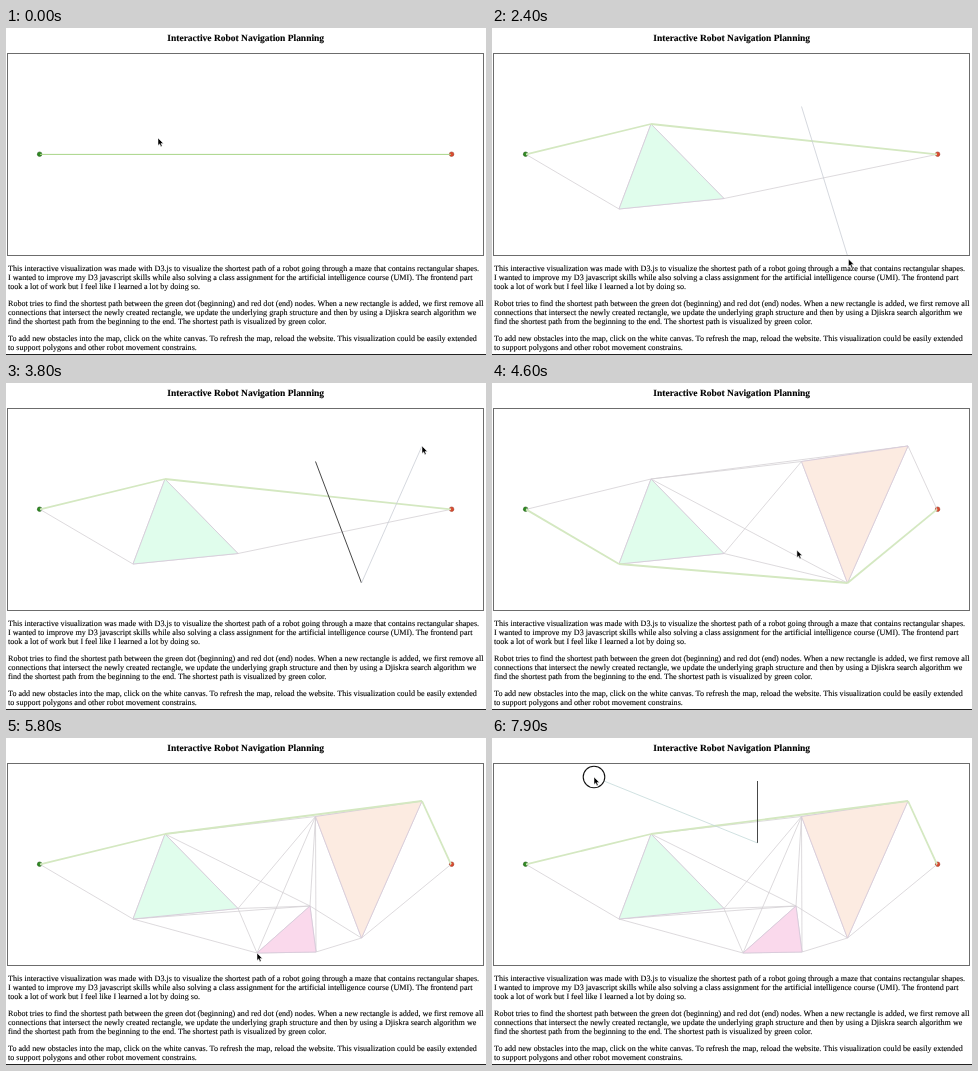
Recreate the animation shown at these times as an HTML page. Size 480x327 px, loop 8000 ms.

```html
<!DOCTYPE html>
<html lang="en">
<head>
<meta charset="utf-8">
<title>Interactive Robot Navigation Planning</title>
<style>
  html, body { margin: 0; width: 100%; height: 100%; overflow: hidden; background: #fff; }
  svg { display: block; }
  text { font: 8.1px "Liberation Serif", Times, serif; text-rendering: geometricPrecision; stroke: #000; stroke-width: .1; }
  .title { font-size: 9.49px; font-weight: bold; text-anchor: middle; }
  .edge { stroke: #d5d1d5; stroke-width: .8; }
  .route { stroke: #d4e8c1; stroke-width: 1.8; }
  .direct { stroke: #a8d588; stroke-width: 1; }
  .shape { stroke: #d6c8da; stroke-width: .8; }
  #solid { stroke: #333; stroke-width: .9; }
  #band { stroke-width: .8; }
</style>
</head>
<body>
<svg width="480" height="327" viewBox="0 0 480 327">
  <clipPath id="map"><rect x="2" y="26" width="475" height="201"/></clipPath>
  <text class="title" x="239.7" y="13">Interactive Robot Navigation Planning</text>
  <g id="copy"></g>
  <rect x="0" y="326" width="480" height="1" fill="#222"/>
  <rect x="1.5" y="25.5" width="476" height="202" fill="none" stroke="#6c6c6c"/>
  <g clip-path="url(#map)">
    <circle cx="33.6" cy="126.2" r="2.3" fill="#2f8a22" stroke="#24571c" stroke-width=".5"/>
    <circle cx="445.6" cy="126.2" r="2.3" fill="#dc4a2e" stroke="#8f3a2a" stroke-width=".5"/>
    <g id="graph"></g>
    <line id="solid"/>
    <line id="band"/>
  </g>
  <g id="pointer">
    <circle id="ring" r="10.8" fill="#fff" fill-opacity=".9" stroke="#111" stroke-width="1.1"/>
    <path d="M0 0V7.4L1.7 5.9 2.9 8.7 4.2 8.1 3 5.4H5.4Z" stroke="#fff" stroke-width=".5"/>
  </g>
</svg>
<script>
const $ = id => document.getElementById(id);
const LOOP = 8000, STEP = 100, TRAVEL = 500, LAG = 150;

const paragraphs = [
  ['This interactive visualization was made with D3.js to visualize the shortest path of a robot going through a maze that contains rectangular shapes.',
    'I wanted to improve my D3 javascript skills while also solving a class assignment for the artificial intelligence course (UMI). The frontend part',
    'took a lot of work but I feel like I learned a lot by doing so.'],
  ['Robot tries to find the shortest path between the green dot (beginning) and red dot (end) nodes. When a new rectangle is added, we first remove all',
    'connections that intersect the newly created rectangle, we update the underlying graph structure and then by using a Djiskra search algorithm we',
    'find the shortest path from the beginning to the end. The shortest path is visualized by green color.'],
  ['To add new obstacles into the map, click on the white canvas. To refresh the map, reload the website. This visualization could be easily extended',
    'to support polygons and other robot movement constrains.']
];
$('copy').innerHTML = paragraphs.map((rows, p) => rows.map((row, i) =>
  `<text x="2" y="${242.7 + p * 35.1 + i * 9.1}">${row}</text>`).join('')).join('');

// every click in order: x, y, time; X and Y miss the canvas
const clicks = {
  A: [159, 96, 200], X: [281, 263, 500], B: [232, 170.5, 700], C: [127, 181, 950],
  D: [309.5, 78.5, 1700], Y: [356.5, 231, 2200], G: [355.5, 200, 2900], F: [416, 63, 3700],
  H: [304, 168, 4700], J: [310, 214, 5100], K: [251, 215, 5600],
  M: [265.5, 43, 6600], N: [265.5, 105, 6900], Z: [102, 39, 7900]
};
const nodes = { S: [34, 126.4], E: [445, 126.4], ...clicks };
const stops = [[152, 110, 0], ...Object.values(clicks)];

const shapes = [
  { corners: 'ABC', fill: '#e0fdec', band: '#cdd3d8' },
  { corners: 'DGF', fill: '#fcebe1', band: '#cbced6' },
  { corners: 'HJK', fill: '#fad9ec', band: '#d6ced6' },
  { corners: 'MNZ', band: '#c4dada' }
];
const placed = (name, t) => t >= clicks[name][2] + LAG;

const side = ([ax, ay], [bx, by], [cx, cy]) => Math.sign((bx - ax) * (cy - ay) - (by - ay) * (cx - ax));
const crosses = (a, b, c, d) => side(a, b, c) * side(a, b, d) < 0 && side(c, d, a) * side(c, d, b) < 0;
const pairs = names => [...names].flatMap((a, i) => [...names].slice(i + 1).map(b => a + b));
const ends = ([a, b]) => [nodes[a], nodes[b]];

function visibleEdges(done) {
  const walls = done.flatMap(s => pairs(s.corners)).map(ends);
  return pairs('SE' + done.map(s => s.corners).join(''))
    .filter(edge => !walls.some(wall => crosses(...ends(edge), ...wall)));
}

function shortestRoute(edges) {
  const best = { S: { cost: 0, path: [] } };
  const relax = (from, to, edge) => {
    if (!best[from]) return;
    const [[x1, y1], [x2, y2]] = ends(edge);
    const cost = best[from].cost + Math.hypot(x2 - x1, y2 - y1);
    if (!best[to] || cost < best[to].cost) best[to] = { cost, path: [...best[from].path, edge] };
  };
  for (const _ in nodes) for (const edge of edges) {
    const [a, b] = edge;
    relax(a, b, edge);
    relax(b, a, edge);
  }
  return best.E.path;
}

const lines = (edges, cls) => edges.map(edge => {
  const [[x1, y1], [x2, y2]] = ends(edge);
  return `<line class="${cls}" x1="${x1}" y1="${y1}" x2="${x2}" y2="${y2}"/>`;
}).join('');

function drawGraph(done) {
  const edges = visibleEdges(done), route = shortestRoute(edges);
  const polygons = done.map(({ corners, fill }) =>
    `<polygon class="shape" fill="${fill}" points="${[...corners].map(c => nodes[c].slice(0, 2)).join(' ')}"/>`);
  $('graph').innerHTML = lines(edges.filter(e => !route.includes(e)), 'edge') +
    polygons.join('') + lines(route, done.length ? 'route' : 'direct');
}

function setLine(el, from, to) {
  el.style.display = from ? '' : 'none';
  if (!from) return;
  [['x1', from[0]], ['y1', from[1]], ['x2', to[0]], ['y2', to[1]]].forEach(a => el.setAttribute(...a));
}

// rest after a click, then ease out to the next one
function cursorAt(t) {
  const i = stops.findIndex(s => s[2] > t);
  if (i < 0) return stops.at(-1).slice(0, 2);
  const [x0, y0, t0] = stops[i - 1], [x1, y1, t1] = stops[i];
  const begin = Math.max(t0, t1 - TRAVEL);
  const p = 1 - (1 - Math.max(0, (t - begin) / (t1 - begin))) ** 3;
  return [x0 + (x1 - x0) * p, y0 + (y1 - y0) * p];
}

let drawn = -1, last = -1;
function render(t) {
  const done = shapes.filter(s => placed(s.corners[2], t));
  if (done.length !== drawn) {
    drawn = done.length;
    drawGraph(done);
  }

  const tip = cursorAt(t), { corners: [a, b], band } = shapes[drawn];
  const hasA = placed(a, t), hasB = placed(b, t);
  setLine($('solid'), hasB && nodes[a], nodes[b]);
  setLine($('band'), hasA && nodes[hasB ? b : a], tip);
  $('band').style.stroke = band;

  const pressed = Object.values(clicks).some(c => t >= c[2] && t < c[2] + STEP);
  $('pointer').setAttribute('transform', `translate(${tip})`);
  $('ring').style.display = pressed ? '' : 'none';
}

// the picture advances ten times a second
const start = performance.now();
function tick() {
  const t = Math.floor((performance.now() - start) % LOOP / STEP) * STEP;
  if (t !== last) render(last = t);
  requestAnimationFrame(tick);
}
tick();
</script>
</body>
</html>
```
